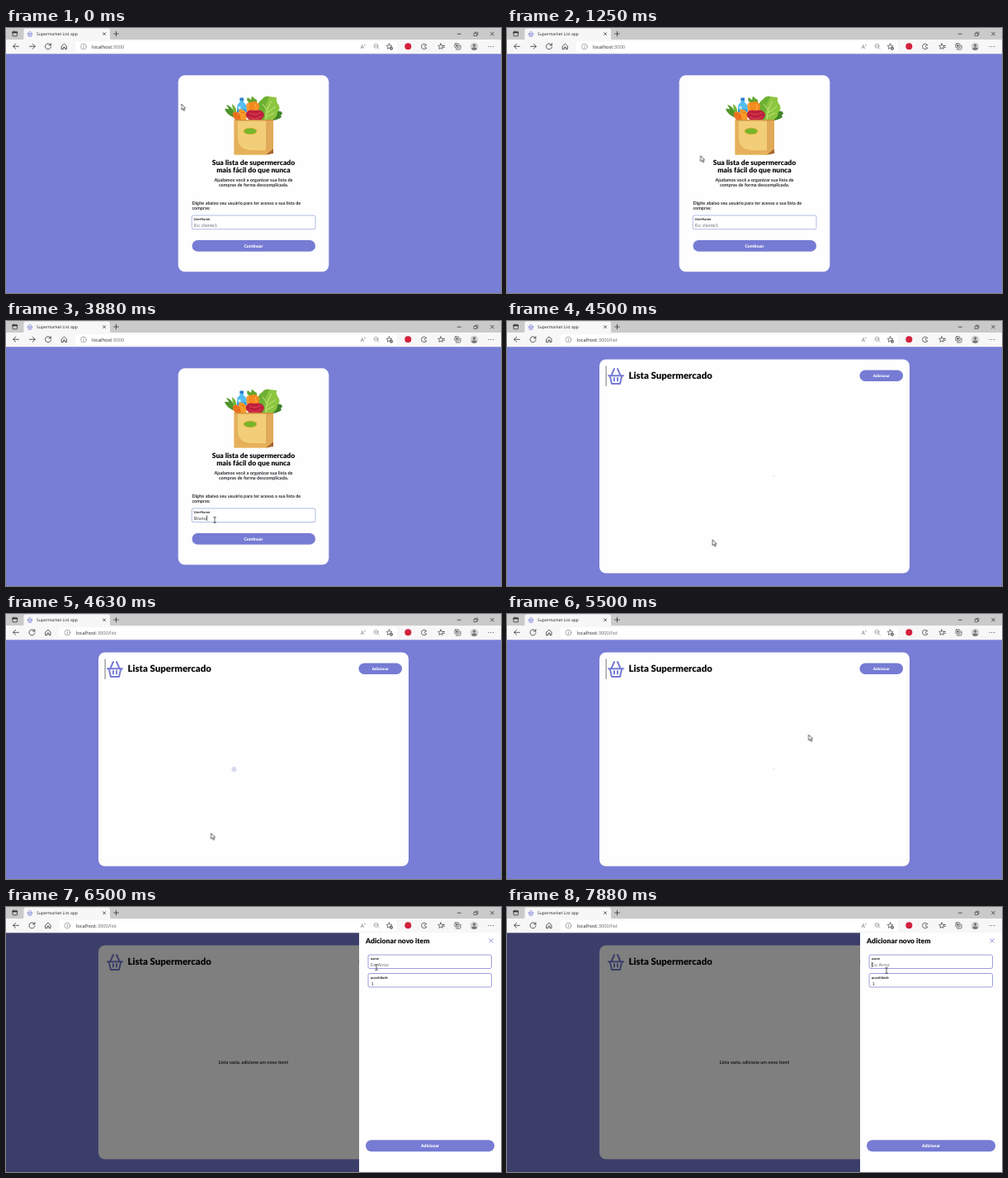
These frames come from a looping animation (600x321 px, 8 s). An HTML page:

```html
<!DOCTYPE html>
<html lang="pt-BR">
<head>
<meta charset="utf-8">
<title>Lista Supermercado</title>
<style>
  html, body { margin: 0; height: 100%; overflow: hidden; background: #787dd5; }
  svg { display: block; width: 100vw; height: 100vh; }
  text { font-family: Lato, "Open Sans", sans-serif; font-size: 5.5px; font-weight: 700; fill: #24242a; text-rendering: geometricPrecision; }
  .ui { font-family: "Open Sans", "Noto Sans", sans-serif; font-weight: 400; fill: #222; }
  .tab { font-size: 5px; }
  .url { font-size: 5.8px; }
  .url .rest { fill: #666; }
  .h1 { font-size: 11.4px; font-weight: 900; fill: #08080c; }
  .h2 { font-size: 8.55px; font-weight: 900; fill: #08080c; }
  .mid { text-anchor: middle; }
  .btn { font-size: 5.1px; font-weight: 900; fill: #fff; text-anchor: middle; }
  .label { font-size: 4.2px; }
  .hint { font-weight: 400; fill: #666a74; }
  .value { font-weight: 400; fill: #333; }
  .card { fill: #fefefe; }
  .fill { fill: #767bd4; }
  .field { fill: #fff; stroke: #8186d3; stroke-width: .8; }
  .login .field { stroke: #8f9fd6; stroke-width: .7; }
  .line { fill: none; stroke: #333; stroke-width: .8; stroke-linecap: round; stroke-linejoin: round; }
  .caret { fill: #222; }

  /* Every scene switch shares one 8 s clock */
  .login, .list, .drawer, .loader, .empty, .hint-user, .typing, .page-caret,
  .name-caret, .arrow, .beam, .hand { animation: 8s step-end infinite; }
  .login { animation-name: login; }
  .list { animation-name: list; }
  .drawer { animation-name: drawer; }
  .loader { animation-name: loader; }
  .empty { animation-name: empty; }
  .hint-user { animation-name: hint; }
  .typing { animation-name: typing; }
  .page-caret { animation-name: page-caret; }
  .name-caret { animation-name: name-caret; }
  .arrow { animation-name: arrow; }
  .beam { animation-name: beam; }
  .hand { animation-name: hand; }

  @keyframes login { 0% { opacity: 1 } 56.25%, 100% { opacity: 0 } }
  @keyframes list { 0% { opacity: 0 } 56.25%, 100% { opacity: 1 } }
  @keyframes drawer { 0% { opacity: 0 } 81.25%, 100% { opacity: 1 } }
  @keyframes loader { 0% { opacity: 1 } 71.875%, 100% { opacity: 0 } }
  @keyframes empty { 0% { opacity: 0 } 71.875%, 100% { opacity: 1 } }
  @keyframes hint { 0% { opacity: 1 } 36.25%, 100% { opacity: 0 } }
  @keyframes typing { 0% { opacity: 0 } 33.75% { opacity: 1 } 52.5%, 100% { opacity: 0 } }
  @keyframes page-caret { 0% { opacity: 0 } 56.25% { opacity: 1 } 62.5% { opacity: 0 } 68.75% { opacity: 1 } 75%, 100% { opacity: 0 } }
  @keyframes name-caret { 0% { opacity: 0 } 93.75%, 100% { opacity: 1 } }
  @keyframes arrow { 0% { opacity: 1 } 26% { opacity: 0 } 56.25% { opacity: 1 } 75%, 100% { opacity: 0 } }
  @keyframes beam { 0% { opacity: 0 } 26% { opacity: 1 } 52% { opacity: 0 } 81.25%, 100% { opacity: 1 } }
  @keyframes hand { 0% { opacity: 0 } 52% { opacity: 1 } 56.25% { opacity: 0 } 75% { opacity: 1 } 81.25%, 100% { opacity: 0 } }

  .typed tspan { fill-opacity: 0; animation: letter 8s step-end calc(2.9s + var(--i) * .16s) infinite; }
  @keyframes letter { 0% { fill-opacity: 1 } 30%, 100% { fill-opacity: 0 } }
  .advance { animation: advance 8s linear infinite; }
  @keyframes advance {
    0% { transform: none }
    36.25% { transform: none; animation-timing-function: steps(5, start) }
    46.25%, 100% { transform: translateX(15px) }
  }

  .loader circle { transform-box: fill-box; transform-origin: center; animation: beat 1s linear infinite; }
  @keyframes beat {
    0%, 75%, 100% { transform: scale(0); opacity: 0 }
    33% { transform: scale(1); opacity: .7 }
  }

  .pointer { animation: pointer 8s linear infinite; }
  @keyframes pointer {
    0%, 6% { transform: translate(212.5px, 92px) }
    18% { transform: translate(240px, 170px) }
    27%, 49% { transform: translate(253px, 241px) }
    54% { transform: translate(250px, 264px) }
    57.9%, 59% { transform: translate(248.5px, 265.5px) }
    65.6% { transform: translate(330px, 180px) }
    76%, 81.24% { transform: translate(447px, 69px) }
    81.25%, 84% { transform: translate(449px, 73px) }
    88% { transform: translate(476px, 72px) }
    95%, 100% { transform: translate(460px, 77px) }
  }
</style>
</head>
<body>
<svg viewBox="0 0 600 321" preserveAspectRatio="none">
  <defs>
    <g id="basket" fill="none" stroke="#767bd4" stroke-width="2" stroke-linecap="round" stroke-linejoin="round">
      <path d="M1 9.3H19M2.8 9.5L5 19H15L17.2 9.5M4.4 9L8 1M15.6 9L12 1"/>
      <path d="M8 12V15.5M12 12V15.5"/>
    </g>
    <g id="reload" class="line">
      <path d="M3.2 -1.5A3.5 3.5 0 1 0 3.5 .6M3.4 -3.6V-1.3H1.1"/>
    </g>
    <g id="home" class="line"><path d="M-3 -.4L0 -3.2L3 -.4V3.3H1V.8H-1V3.3H-3Z"/></g>
    <g id="info" class="line" style="stroke:#777;stroke-width:.6"><circle r="3.4"/><path d="M0 -.4V1.7M0 -1.7V-1.6"/></g>
    <path id="back" class="line" d="M3.5 0H-3.3M-.3 -3L-3.3 0L-.3 3"/>
    <path id="star" class="line" style="stroke-width:.65" d="M0 -3.4L1 -1.1L3.4 -.9L1.6 .7L2.1 3.1L0 1.8L-2.1 3.1L-1.6 .7L-3.4 -.9L-1 -1.1Z"/>
  </defs>

  <rect width="600" height="321" fill="#787dd5"/>

  <g class="login">
    <rect class="card" x="208.700" y="57.300" width="182.600" height="238" rx="8"/>

    <!-- Grocery bag -->
    <g>
      <path d="M322 111Q329 108 328 101Q334 99 335 104Q332 105 334 108Q328 112 322 112Z" fill="#3f8426"/>
      <path d="M306 112Q304 103 307 97Q305 90 311 86Q314 82 319 83L328 84Q327 88 329 91Q334 97 329 102Q329 108 322 112Z" fill="#8cc63f"/>
      <path d="M306 96Q304 90 311 86Q314 82 319 83L314 95L313 112H306Z" fill="#6db033"/>
      <path d="M315 111Q315 99 322 88M316 103L327 95M316 99L311 92M315 108L325 103" fill="none" stroke="#cfe78d" stroke-width=".9"/>
      <path d="M296 91Q290 88 293 84L297 87L298 82.500L302 86Q306 87 303 92Z" fill="#62a531"/>
      <path d="M291 96Q291 89 297 90Q304 87 307 94L306 103H293Z" fill="#f58a1f"/>
      <path d="M294 92Q292 96 294 100M302 92Q304 96 303 100" fill="none" stroke="#fbb04a" stroke-width="1.100"/>
      <path d="M283.500 85H288V90Q291.500 92 291.500 96V108H280V96Q280 92 283.500 90Z" fill="#55bdf0"/>
      <path d="M283.500 84.500H288V88H283.500Z" fill="#2f7fc9"/>
      <path d="M281.500 95H284.500V106H281.500Z" fill="#bfe9fc"/>
      <path d="M280 98.500H291.500V102H280Z" fill="#2f96dc"/>
      <path d="M265 98Q271 97 276 103L280 109L275 108Q267 104 265 98ZM267 93Q273 94 277 103L272 101Z" fill="#4f962b"/>
      <path d="M274 92Q280 96 279 103L275 101Z" fill="#73b535"/>
      <path d="M275 103Q279 99 284 104L291 112H279Q274 108 275 103Z" fill="#ee7420"/>
      <path d="M282 99Q289 97 292 105L291 112H285Z" fill="#f99a27"/>
      <path d="M276 105L280 105M279 109L284 107M285 102L289 103" stroke="#cf5e15" stroke-width=".7"/>
      <path d="M290.500 105Q292 98 301 100Q311 98 313 105Q312 112 302 113Q292 112 290.500 105Z" fill="#be1f3c"/>
      <path d="M295 103Q302 107 309 102M294 108Q302 112 310 107" fill="none" stroke="#e5485c" stroke-width=".9"/>
      <path d="M276.500 111H324V150L318 153.500H276.500Z" fill="#f2ce78"/>
      <path d="M276.500 113H281V133Q281 147 297 148H316V153.500H276.500Z" fill="#e6b05b"/>
      <path d="M315 112L324 111V150L318 153.500L315 149Z" fill="#e0aa58"/>
      <path d="M276.500 111H324V112.500H276.500Z" fill="#cf9342"/>
      <path d="M315 153.500L324 146.500V152Z" fill="#a9622f"/>
      <ellipse cx="296" cy="125" rx="8.500" ry="4.200" fill="#e5b63e"/>
      <ellipse cx="296" cy="125" rx="7.500" ry="3.400" fill="#77b52c"/>
    </g>

    <text class="h2 mid" x="300" y="166.300">Sua lista de supermercado</text>
    <text class="h2 mid" x="300" y="174.600">mais fácil do que nunca</text>
    <text class="mid" x="300" y="185.500" style="font-size:5.6px">Ajudamos você a organizar sua lista de</text>
    <text class="mid" x="300" y="192" style="font-size:5.6px">compras de forma descomplicada.</text>
    <text x="225.500" y="213.500">Digite abaixo seu usuário para ter acesso a sua lista de</text>
    <text x="225.500" y="220">compras:</text>

    <rect class="field" x="225.200" y="227" width="149.800" height="16.700" rx="2"/>
    <text class="label" x="227.500" y="233.400">UserName</text>
    <text class="hint hint-user" x="228" y="241">Ex: cliente1</text>
    <text class="value typed" x="228" y="241"><tspan style="--i:0">B</tspan><tspan style="--i:1">r</tspan><tspan style="--i:2">u</tspan><tspan style="--i:3">n</tspan><tspan style="--i:4">o</tspan></text>
    <g class="typing"><rect class="caret advance" x="228.200" y="235.500" width=".7" height="6.500"/></g>

    <rect class="fill" x="225.500" y="257" width="149.500" height="13.800" rx="6.900"/>
    <text class="btn" x="300" y="265.800">Continuar</text>
  </g>

  <g class="list">
    <rect class="card" x="112" y="46.500" width="376" height="259" rx="8"/>
    <rect class="page-caret" x="119.600" y="54.500" width="1" height="24.500" fill="#777"/>
    <use href="#basket" x="122" y="57"/>
    <text class="h1" x="147.500" y="70.200">Lista Supermercado</text>
    <rect class="fill" x="427.500" y="59.500" width="52.500" height="13.500" rx="6.750"/>
    <text class="btn" style="font-size:4.6px" x="453.800" y="67.900">Adicionar</text>
    <g class="loader fill">
      <circle cx="276.500" cy="188" r="8" style="animation-delay:-.5s"/>
      <circle cx="300" cy="188" r="8" style="animation-delay:-.34s"/>
      <circle cx="323.500" cy="188" r="8" style="animation-delay:-.18s"/>
    </g>
    <text class="mid empty" x="300" y="190">Lista vazia, adicione um novo item!</text>
  </g>

  <g class="drawer">
    <rect y="31" width="600" height="290" opacity=".5"/>
    <rect class="card" x="428" y="31" width="172" height="290"/>
    <text class="h2" x="436" y="43.500">Adicionar novo item</text>
    <path class="line" style="stroke:#767bd4" d="M585.700 38.500L590.300 43.100M590.300 38.500L585.700 43.100"/>
    <rect class="field" x="439" y="58" width="149.500" height="16.500" rx="2"/>
    <text class="label" x="441.800" y="64.300">name</text>
    <text class="hint" x="442" y="72">Ex: Arroz</text>
    <rect class="caret name-caret" x="442" y="66.500" width=".7" height="6.500"/>
    <rect class="field" x="439" y="80.500" width="149.500" height="16.500" rx="2"/>
    <text class="label" x="441.800" y="86.800">quantidade</text>
    <text class="value" x="442.500" y="94.700">1</text>
    <rect class="fill" x="436" y="282.300" width="156" height="14" rx="7"/>
    <text class="btn" x="514" y="291">Adicionar</text>
  </g>

  <!-- Browser frame -->
  <rect width="600" height="15" fill="#cacaca"/>
  <rect y="14" width="600" height="17.300" fill="#f7f7f7"/>
  <path d="M20 14.500Q21.500 14 21.500 12V3Q21.500 .5 24 .5H123.500Q126 .5 126 3V12Q126 14 127.500 14.500Z" fill="#f7f7f7"/>
  <use href="#basket" transform="translate(25.600 3.800) scale(.34)"/>
  <text class="ui tab" x="37" y="9">Supermarket List app</text>
  <g class="line">
    <rect x="8" y="4.300" width="5.500" height="5.500" rx=".8"/>
    <path d="M8 5.500H13.500" stroke-width="1.500"/>
    <path d="M117.700 5.700L120.600 8.600M120.600 5.700L117.700 8.600M130.700 7H136.300M133.500 4.200V9.800"/>
    <path d="M547.300 7.200H551.300M587.500 5.200L591.300 9M591.300 5.200L587.500 9"/>
    <path d="M567.500 6.300H570.700V9.500H567.500ZM568.600 6.300V5.100H571.900V8.400H570.700" style="stroke-width:.6"/>
  </g>

  <use href="#back" x="12" y="22.300"/>
  <g class="login">
    <use href="#back" transform="translate(32 22.300) scale(-1 1)"/>
    <use href="#reload" x="51" y="22.300"/>
    <use href="#home" x="70.500" y="22.300"/>
    <rect x="84" y="16" width="390" height="13" rx="3" fill="#fff"/>
    <use href="#info" x="94" y="22.500"/>
    <text class="ui url" x="104" y="24.600">localhost<tspan class="rest">:3000</tspan></text>
  </g>
  <g class="list">
    <use href="#reload" x="31.500" y="22.300"/>
    <use href="#home" x="51" y="22.300"/>
    <rect x="64.500" y="16" width="409.500" height="13" rx="3" fill="#fff"/>
    <use href="#info" x="74.500" y="22.500"/>
    <text class="ui url" x="84.800" y="24.600">localhost<tspan class="rest">:3000/list</tspan></text>
  </g>

  <text class="ui" style="font-size:6.500px;fill:#666" x="429.700" y="25">A</text>
  <path class="line" style="stroke:#777;stroke-width:.6" d="M434.800 19.500Q436 20.500 434.800 21.800"/>
  <g class="line" style="stroke:#777;stroke-width:.6">
    <circle cx="448.500" cy="21.800" r="2.500"/>
    <path d="M450.400 23.700L452.200 25.500M447.400 21.800H449.600"/>
  </g>
  <use href="#star" x="464.500" y="22.300"/>
  <circle cx="467" cy="24.800" r="2" fill="#555"/>
  <path d="M466 24.800H468M467 23.800V25.800" stroke="#fff" stroke-width=".5"/>
  <circle cx="487.300" cy="22.300" r="4" fill="#d3213d"/>
  <path class="line" style="stroke-width:.7" d="M509.500 20.500Q508 18.800 506 19.200Q503.500 19.700 503.500 22.500Q503.500 25.700 507 25.700Q509 25.700 509.700 24.300M509.500 20.500Q507 21 507.300 22.500Q507.600 24 509.700 24.300"/>
  <use href="#star" x="527" y="22.300"/>
  <path class="line" style="stroke-width:.7" d="M529.500 21.500H531.500M530 23.500H531.500"/>
  <g class="line" style="stroke-width:.7">
    <rect x="544" y="19" width="5" height="5" rx="1"/>
    <path d="M545.500 26H549.500Q551 26 551 24.500V21M546.500 20.300V22.700M545.300 21.500H547.700"/>
  </g>
  <circle cx="567.500" cy="22.500" r="4.800" fill="#d2d2d2"/>
  <circle cx="567.500" cy="21" r="1.800" fill="#777"/>
  <path d="M564 25.800Q564.500 23.300 567.500 23.300Q570.500 23.300 571 25.800Q567.500 28 564 25.800Z" fill="#777"/>
  <path d="M585 22.500H591" fill="none" stroke="#333" stroke-width="1.100" stroke-linecap="round" stroke-dasharray="0 2.700"/>

  <g class="pointer">
    <path class="arrow" d="M0 0V7L1.700 5.500L2.900 8.200L4.100 7.600L2.900 5.100H5Z" fill="#fff" stroke="#222" stroke-width=".7" stroke-linejoin="round"/>
    <path class="beam line" style="stroke:#222;stroke-width:.7" d="M-1.400 -3.300H-.5L0 -2.900L.5 -3.300H1.400M0 -2.900V2.900M-1.400 3.300H-.5L0 2.900L.5 3.300H1.400"/>
    <path class="hand" d="M0 .2Q.8 -.6 1.500 .3V3.600L4.800 4.400Q5.500 4.700 5.300 5.800L4.500 9.500H.3L-2 6Q-2.300 5 -1.200 5L0 6Z" fill="#fff" stroke="#222" stroke-width=".7" stroke-linejoin="round"/>
  </g>
</svg>
</body>
</html>
```
